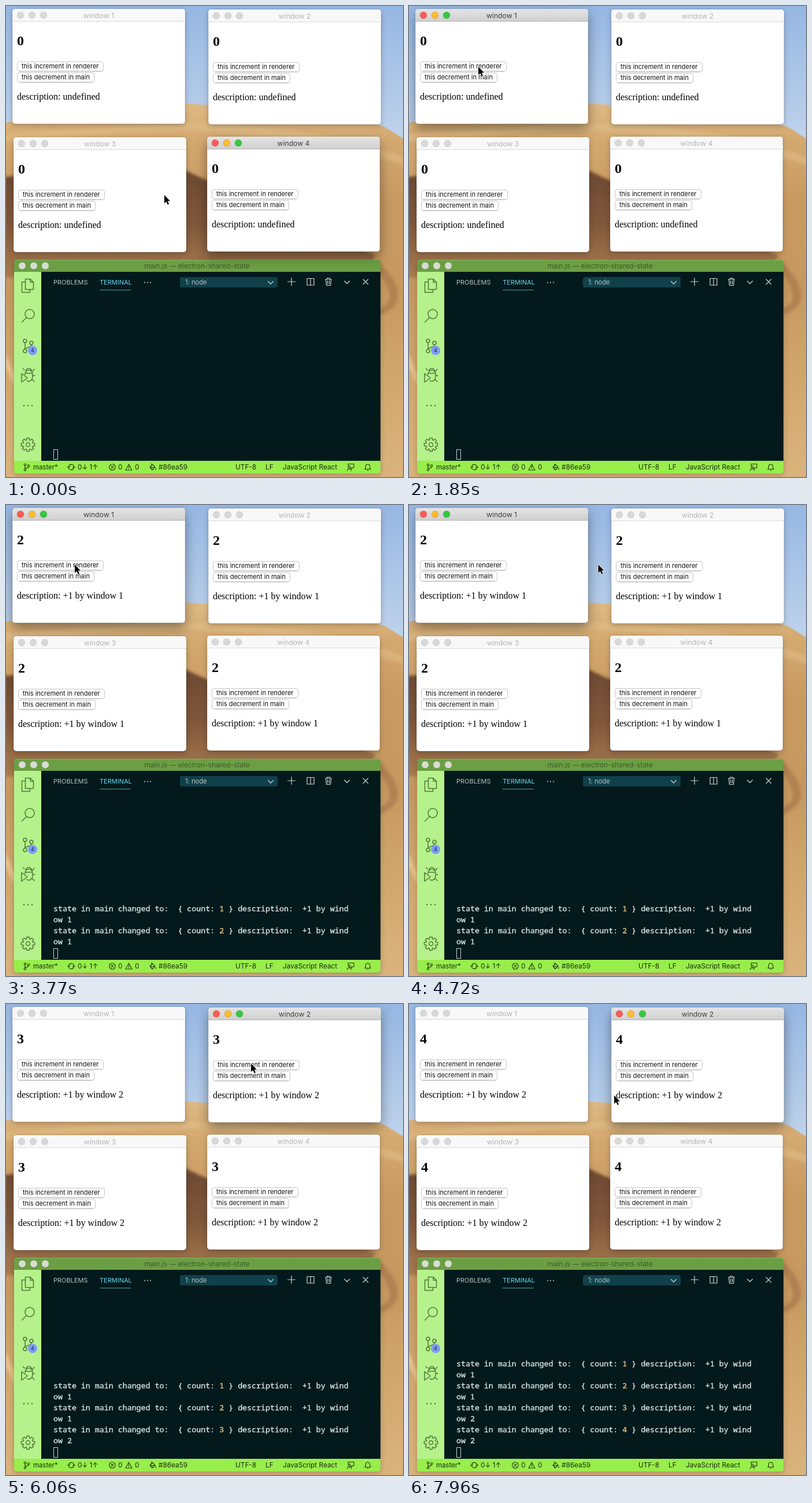
An HTML page for the animation above (7990 ms loop, 687x815 px).

```html
<!DOCTYPE html>
<html lang="en">
<head>
<meta charset="utf-8">
<title>Shared state demo</title>
<style>
html, body { margin: 0; width: 100%; height: 100%; overflow: hidden; }
svg { display: block; }
text { white-space: pre; }
.ui { font-family: Inter, sans-serif; }
.doc { font-family: "Liberation Serif", serif; }
.mono { font-family: "Noto Sans Mono", monospace; font-size: 13.3px; fill: #d9e4e5; stroke: #d9e4e5; stroke-width: .35px; }
.num { fill: #e8c584; stroke: #e8c584; }
.mid { text-anchor: middle; }
.line { fill: none; stroke-linecap: round; stroke-linejoin: round; }
</style>
</head>
<body>
<svg id="stage" width="687" height="815" viewBox="0 0 687 815">
<defs>
  <linearGradient id="sky" x2="0" y2="1">
    <stop offset="0" stop-color="#96b7e3"/><stop offset="1" stop-color="#c1d4eb"/>
  </linearGradient>
  <linearGradient id="sand" x2="0" y2="1">
    <stop offset="0" stop-color="#deb984"/><stop offset=".1" stop-color="#d4a970"/>
    <stop offset=".25" stop-color="#c99a61"/><stop offset=".5" stop-color="#c6985f"/>
    <stop offset=".7" stop-color="#d0a56c"/><stop offset="1" stop-color="#dab37c"/>
  </linearGradient>
  <linearGradient id="shade" x2="0" y2="1">
    <stop offset="0" stop-color="#6d4932"/><stop offset=".5" stop-color="#80583b"/>
    <stop offset="1" stop-color="#a97c4f"/>
  </linearGradient>
  <linearGradient id="barOn" x2="0" y2="1">
    <stop offset="0" stop-color="#e4e4e4"/><stop offset="1" stop-color="#cfcfcf"/>
  </linearGradient>
  <linearGradient id="press" x2="0" y2="1">
    <stop offset="0" stop-color="#3a8af7"/><stop offset="1" stop-color="#0a5cf2"/>
  </linearGradient>
  <filter id="soft" x="-20%" y="-20%" width="140%" height="140%"><feGaussianBlur stdDeviation="2.5"/></filter>
  <filter id="low" x="-20%" y="-20%" width="140%" height="150%"><feDropShadow dx="0" dy="3" stdDeviation="5" flood-opacity=".22"/></filter>
  <filter id="high" x="-20%" y="-20%" width="140%" height="160%"><feDropShadow dx="0" dy="9" stdDeviation="10" flood-opacity=".38"/></filter>
</defs>

<!-- dunes -->
<rect width="687" height="815" fill="#d4aa70"/>
<rect width="687" height="245" fill="url(#sky)"/>
<path d="M0 202C60 190 210 170 316 169C420 176 570 184 655 209L687 229V815H0Z" fill="url(#sand)"/>
<g filter="url(#soft)">
  <path d="M-5 222C100 214 220 206 316 203C420 206 560 212 692 262V276C560 236 430 220 330 216C220 214 120 226 -5 236Z" fill="#e2bf8b" opacity=".5"/>
  <path d="M-5 296C100 286 220 280 312 285C350 305 520 372 640 432L610 470H-5Z" fill="url(#shade)"/>
  <path d="M640 440C668 462 684 490 676 512C668 528 655 532 640 536V526C662 520 668 505 662 492C657 476 650 466 640 460Z" fill="#a2744a" opacity=".6"/>
  <path d="M-5 600C4 606 8 625 16 640V660C6 640 2 628 -5 622Z" fill="#e4c18d"/>
</g>

<!-- editor -->
<g class="ui">
  <rect x="14" y="439" width="634" height="370" rx="5" fill="#98ee4c" filter="url(#low)"/>
  <path d="M14 460V444a5 5 0 0 1 5-5H643a5 5 0 0 1 5 5V460Z" fill="#6c9f44"/>
  <path d="M18 439.5H644" stroke="#87b562"/>
  <g fill="#d8dcd5"><circle cx="28" cy="449.5" r="6"/><circle cx="48" cy="449.5" r="6"/><circle cx="68" cy="449.5" r="6"/></g>
  <text class="mid" x="330.5" y="454" font-size="12" fill="#3d5b29">main.js — electron-shared-state</text>
  <rect x="14" y="460" width="47" height="327" fill="#b6f28c"/>
  <rect x="61" y="460" width="587" height="327" fill="#03191c"/>

  <g class="line" stroke="#4f7839" stroke-width="1.5">
    <path d="M33.500 472.500H42L47.500 478V490.500H33.500ZM42 472.500V478H47.500M33.500 477.500H27.500V495.500H41.500V490.500"/>
    <circle cx="41" cy="533" r="8"/><path d="M35.500 539L27.500 547"/>
    <circle cx="33" cy="579.500" r="3"/><circle cx="33" cy="597" r="3"/><circle cx="44" cy="583" r="3"/>
    <path d="M33 582.500V594M44 586C44 591 36 590 33.500 593"/>
    <path d="M33 638V637a6.500 7 0 0 1 13 0v4a6.500 8 0 0 1-10 7M34.500 632a5 5 0 0 1 10 0M33 635.500H46M32 630L29.500 627.500M46 632L49 628.500M46.500 639.500H50M45 646L49 650M27 636V651L37 643.500Z"/>
    <path id="gear"/><circle cx="38" cy="759" r="3.500"/>
  </g>
  <g fill="#4f7839"><circle cx="31" cy="691.500" r="1.300"/><circle cx="38" cy="691.500" r="1.300"/><circle cx="45" cy="691.500" r="1.300"/></g>
  <circle cx="46" cy="596" r="8" fill="#7c9cf4"/>
  <text class="mid" x="46" y="599.300" font-size="9" fill="#142036">4</text>

  <g font-size="11" fill="#b4c2c4">
    <text x="82" y="482">PROBLEMS</text>
    <text x="162" y="482" fill="#66d9ef">TERMINAL</text>
    <circle cx="240" cy="478.500" r="1.100"/><circle cx="245" cy="478.500" r="1.100"/><circle cx="250" cy="478.500" r="1.100"/>
    <path d="M162 491.500H216" stroke="#4a9dae"/>
    <rect x="301" y="469" width="169" height="18" rx="3" fill="#10414a"/>
    <text x="310" y="482" font-size="11.200">1: node</text>
  </g>
  <g class="line" stroke="#ccd6d7" stroke-width="1.200">
    <path d="M453.500 476.500L458 481L462.500 476.500M494 470.500V483.500M487.500 477H500.500"/>
    <path d="M521 471.500H533V483H521ZM527 471.500V483"/>
    <path d="M552.500 473H563.500M555.500 473V471H560.500V473M553.500 473L554.500 483.500H561.500L562.500 473M556.500 475.500V481M559.500 475.500V481"/>
    <path d="M585.500 476L590 480.500L594.500 476M618 473L626.500 481.500M626.500 473L618 481.500"/>
  </g>

  <g font-size="11.800" fill="#1b2c10">
    <text x="47" y="802" font-size="11.400">master*</text>
    <text x="124" y="802">0↓ 1↑</text>
    <text x="194" y="802">0</text>
    <text x="223" y="802">0</text>
    <text x="264" y="802">#86ea59</text>
    <text x="397" y="802">UTF-8</text>
    <text x="449" y="802">LF</text>
    <text x="479" y="802">JavaScript React</text>
  </g>
  <g class="line" stroke="#22380f" stroke-width="1.100">
    <circle cx="33" cy="794" r="1.700"/><circle cx="33" cy="802.500" r="1.700"/><circle cx="39" cy="795.500" r="1.700"/>
    <path d="M33 796V800.500M39 797.500C39 800 35 799 33.500 800.500"/>
    <path d="M108.500 796.500A5 5 0 0 1 117.500 796M117.500 799.500A5 5 0 0 1 108.500 800M106.500 797.500L108.500 799L110.500 797M119.500 798.500L117.500 797L115.500 799"/>
    <circle cx="184" cy="798" r="5.300"/><path d="M182 796L186 800M186 796L182 800"/>
    <path d="M212.500 793L218 803H207ZM212.500 796.500V799.500M212.500 801V801.300"/>
    <path d="M249 798L253.500 793.500L258 798L253 803ZM252 792V796M250 798.500H257.500L253 802.500ZM259 800V802.500"/>
    <path d="M592 796V792.500H602V799H599.500L597.500 801V799"/><circle cx="594" cy="798" r="1.900"/><path d="M590.500 804C590.500 800 597.500 800 597.500 804"/>
    <path d="M621 801.500H631C629.500 800 629.500 799 629.500 796.500A3.500 3.500 0 0 0 622.500 796.500C622.500 799 622.500 800 621 801.500ZM625 803.500H627"/>
  </g>
</g>
<g id="log" class="mono"></g>
<rect x="82.500" y="767.500" width="7" height="17" fill="none" stroke="#c3cfd1"/>

<g id="wins"></g>
<path id="mouse" d="M0 0V14.500L3.400 11.500L5.700 16.700L8 15.700L5.800 10.600H10Z" fill="#000" stroke="#fff" stroke-width="1.600" stroke-linejoin="round" paint-order="stroke"/>
</svg>

<script>
const LOOP = 7990;
const $ = id => document.getElementById(id);
const places = [[11, 5], [350, 6], [13, 227], [348, 226]];
const lights = ["#fc5b57", "#fdbc2f", "#35c83f"];

// time pressed, time windows update, time the log updates, window
const clicks = [
  [2230, 2310, 2340, 1],
  [3630, 3740, 3770, 1],
  [5940, 6030, 6060, 2],
  [7320, 7440, 7440, 2]
];

// start, end, steps, x, y
const moves = [
  [60, 850, 29, 120, 108],
  [870, 900, 2, 120, 106],
  [1850, 1850, 1, 120, 105],
  [2020, 2080, 2, 119, 103],
  [4370, 4920, 16, 424, 103],
  [7680, 7960, 9, 355, 158]
];

function button(y, w, label) {
  return `<rect class="btn" x="8.500" y="${y + .5}" width="${w - 1}" height="16.500" rx="3.500" fill="#fff" stroke="#c6c6c6"/>
    <path class="edge" d="M12 ${y + 17}H${w + 4}" stroke="#adadad" stroke-width=".8"/>
    <text class="ui" x="16" y="${y + 12}" font-size="11" fill="#111">${label}</text>`;
}

function makeWindow([x, y], i) {
  const dots = lights.map((c, k) => `<circle class="dot" cx="${14 + 20 * k}" cy="11" r="6"/>`).join("");
  return `<g class="win" transform="translate(${x} ${y})">
    <rect class="body" width="299" height="199" rx="5" fill="#fff" stroke="#000" stroke-opacity=".2" stroke-width=".8"/>
    <path class="bar" d="M0 22V5a5 5 0 0 1 5-5H294a5 5 0 0 1 5 5V22Z"/>
    <path class="rule" d="M0 21.500H299"/>
    ${dots}
    <text class="ui mid title" x="149.500" y="16" font-size="12.200">window ${i + 1}</text>
    <text class="doc count" x="8" y="63" font-size="24" font-weight="bold"></text>
    ${button(91, 150, "this increment in renderer")}
    ${button(110, 134, "this decrement in main")}
    <text class="doc desc" x="8" y="157" font-size="16"></text>
  </g>`;
}

function gearPath() {
  const pts = [];
  for (let k = 0; k < 8; k++) {
    [[-.3, 8.500], [-.2, 11.800], [.2, 11.800], [.3, 8.500]].forEach(([d, r]) => {
      const a = k * Math.PI / 4 + d;
      pts.push((38 + r * Math.cos(a)).toFixed(1) + " " + (759 + r * Math.sin(a)).toFixed(1));
    });
  }
  return "M" + pts.join("L") + "Z";
}

$("gear").setAttribute("d", gearPath());
$("wins").innerHTML = places.map(makeWindow).join("");
const wins = [...document.querySelectorAll(".win")].map(g => ({
  body: g.querySelector(".body"), bar: g.querySelector(".bar"), rule: g.querySelector(".rule"),
  dots: [...g.querySelectorAll(".dot")], title: g.querySelector(".title"),
  count: g.querySelector(".count"), desc: g.querySelector(".desc"),
  btn: g.querySelector(".btn"), edge: g.querySelector(".edge")
}));

const set = (el, name, value) => el.setAttribute(name, value);

function drawWindows(focus, pressed, count, desc) {
  wins.forEach((w, i) => {
    const on = i + 1 === focus, down = i + 1 === pressed;
    set(w.body, "filter", on ? "url(#high)" : "url(#low)");
    set(w.bar, "fill", on ? "url(#barOn)" : "#f8f8f8");
    set(w.rule, "stroke", on ? "#b2b2b2" : "#d8d8d8");
    w.dots.forEach((d, k) => {
      set(d, "fill", on ? lights[k] : "#d8d8d8");
      set(d, "stroke", on ? "#0002" : "#0001");
    });
    set(w.title, "fill", on ? "#404040" : "#b5b5b5");
    set(w.btn, "fill", down ? "url(#press)" : "#fff");
    set(w.btn, "stroke", down ? "#0f55d6" : "#c6c6c6");
    set(w.edge, "opacity", down ? 0 : 1);
    w.count.textContent = count;
    w.desc.textContent = "description: " + desc;
  });
}

let shown = -1;
function drawLog(n) {
  if (n === shown) return;
  shown = n;
  $("log").innerHTML = clicks.slice(0, n).map((c, k) => {
    const y = 741 - 38 * (n - 1 - k);
    return `<text x="82" y="${y}">state in main changed to:  { count: <tspan class="num">${k + 1}</tspan> } description:  +1 by wind</text>
      <text x="82" y="${y + 19}">ow ${c[3]}</text>`;
  }).join("");
}

function mouseAt(t) {
  let x = 274, y = 327;
  for (const [a, b, n, tx, ty] of moves) {
    if (t < a) break;
    const k = a === b ? n : Math.floor((t - a) / (b - a) * (n - 1) + 1e-6) + 1;
    const p = Math.min(k, n) / n, e = p * p * (3 - 2 * p);
    x += (tx - x) * e;
    y += (ty - y) * e;
  }
  return [x, y];
}

function render(t) {
  const focus = t < 1190 ? 4 : t < 5190 ? 1 : 2;
  const done = clicks.filter(c => t >= c[1]);
  const held = clicks.find(c => t >= c[0] && t < c[1]);
  const last = done[done.length - 1];
  drawWindows(focus, held ? held[3] : 0, done.length, last ? "+1 by window " + last[3] : "undefined");
  drawLog(clicks.filter(c => t >= c[2]).length);
  const [x, y] = mouseAt(t);
  set($("mouse"), "transform", `translate(${x.toFixed(1)} ${y.toFixed(1)})`);
}

const start = performance.now();
function tick(now) {
  render(Math.max(0, now - start) % LOOP);
  requestAnimationFrame(tick);
}
render(0);
requestAnimationFrame(tick);
</script>
</body>
</html>
```
